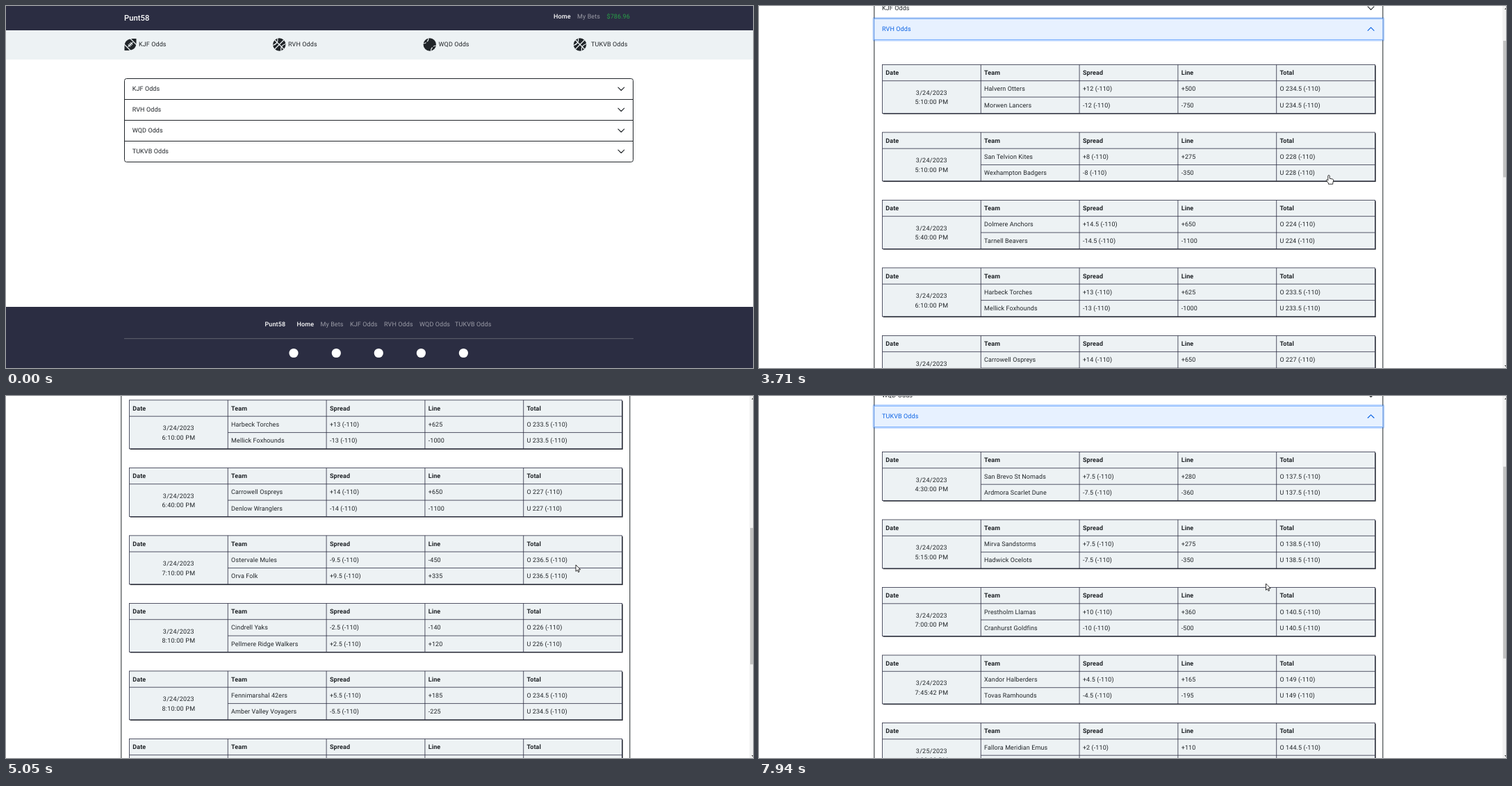
These frames come from a looping animation (1075 by 521 pixels, 8000 ms). An HTML page:

```html
<!DOCTYPE html>
<html lang="en">
<head>
<meta charset="utf-8">
<title>Odds board</title>
<style>
  html, body { margin: 0; width: 100%; height: 100%; overflow: hidden; background: #fff; }
  #stage { display: block; width: 1075px; height: 521px; }
  text {
    font: 9px Roboto, Inter, sans-serif;
    letter-spacing: .1px;
    fill: #212529;
    text-rendering: geometricPrecision;
    white-space: pre;
  }
  .brand { font-size: 11.3px; font-weight: 500; letter-spacing: 0; fill: #fff; }
  .on { font-weight: 500; fill: #fff; }
  .off { fill: #9a9ba6; }
  .cash { fill: #28a148; }
  .head { font-weight: 600; }
  .date { text-anchor: middle; letter-spacing: .25px; }
  .navy { fill: #2b2d42; }
  .pale { fill: #edf2f4; }
  .ink { fill: #212529; }
  .seam { fill: none; stroke: #edf2f4; stroke-width: 1.2; }
  .rule { fill: none; stroke: #212529; stroke-width: 1; }
  .grid { stroke: #2b2d42; stroke-width: .8; }
  .chevron { fill: none; stroke: #212529; stroke-width: 1.1; stroke-linecap: round; stroke-linejoin: round; }
  .open .label { fill: #0c63e4; }
  .open .chevron { stroke: #0c63e4; }
  .pointer { fill: #fff; stroke: #000; stroke-width: .8; stroke-linejoin: round; }
</style>
</head>
<body>
<svg id="stage" viewBox="0 0 1075 521"></svg>
<script>
const LOOP = 8000, VIEW = 521, ROW = 30, PITCH = 97.5, FOOTER = 88;
const LIST_TOP = 104.5, LIST_GAP = 36.5, BAR_SHIFT = 4.7;
const BRAND = 'Punt58';
const LEAGUES = ['KJF Odds', 'RVH Odds', 'WQD Odds', 'TUKVB Odds'];

// date time | away | home | spread | away line | home line | total
const parse = rows => rows.trim().split('\n').map(row => row.split('|'));
const GAMES = {
  1: parse(`
3/24/2023 5:10:00 PM|Halvern Otters|Morwen Lancers|+12|+500|-750|234.5
3/24/2023 5:10:00 PM|San Telvion Kites|Wexhampton Badgers|+8|+275|-350|228
3/24/2023 5:40:00 PM|Dolmere Anchors|Tarnell Beavers|+14.5|+650|-1100|224
3/24/2023 6:10:00 PM|Harbeck Torches|Mellick Foxhounds|+13|+625|-1000|233.5
3/24/2023 6:40:00 PM|Carrowell Ospreys|Denlow Wranglers|+14|+650|-1100|227
3/24/2023 7:10:00 PM|Ostervale Mules|Orva Folk|-9.5|-450|+335|236.5
3/24/2023 8:10:00 PM|Cindrell Yaks|Pellmere Ridge Walkers|-2.5|-140|+120|226
3/24/2023 8:10:00 PM|Fennimarshal 42ers|Amber Valley Voyagers|+5.5|+185|-225|234.5
3/24/2023 8:10:00 PM|Quenlow Reef|Saltamere Barons|+3|+135|-160|239
3/24/2023 8:40:00 PM|Ombrella City Cyclone|Los Mirelos Divers|+5.5|+180|-220|232.5`),
  3: parse(`
3/24/2023 4:30:00 PM|San Brevo St Nomads|Ardmora Scarlet Dune|+7.5|+280|-360|137.5
3/24/2023 5:15:00 PM|Mirva Sandstorms|Hadwick Ocelots|+7.5|+275|-350|138.5
3/24/2023 7:00:00 PM|Prestholm Llamas|Cranhurst Goldfins|+10|+360|-500|140.5
3/24/2023 7:45:42 PM|Xandor Halberders|Tovas Ramhounds|+4.5|+165|-195|149
3/25/2023 4:30:00 PM|Fallora Meridian Emus|Kestrin Valley Moles|+2|+110|-130|144.5
3/25/2023 5:50:00 PM|Gorlan Pelicans|Uldenby Stoats|+3|+130|-150|135.5`)
};
const panelHeight = i => 124 + PITCH * (GAMES[i].length - 1);
const FULL = { 1: panelHeight(1), 3: panelHeight(3) };

// ---- drawing -------------------------------------------------------
const text = (x, y, str, cls = '') => `<text x="${x}" y="${y + 3.2}" class="${cls}">${str}</text>`;
const rect = (x, y, w, h, cls, more = '') =>
  `<rect x="${x}" y="${y}" width="${w}" height="${h}" class="${cls}" ${more}/>`;
const at = (x, y, body) => `<g transform="translate(${x} ${y})">${body}</g>`;

const ball = seams => `<circle r="9.2" class="ink"/><path class="seam" d="${seams}"/>`;
const basketball = ball('M-6.5-6.5L6.5 6.5M6.5-6.5L-6.5 6.5M-2.5-9Q-1-1.5-9 1M2.5 9Q1 1.5 9-1');
const baseball = ball('M-9-1.5Q-6-1.5-5.2-3M-4-4.3Q-1.8-5.5-1.8-9M9 1.5Q6 1.5 5.2 3M4 4.3Q1.8 5.5 1.8 9');
const football = `<path class="ink" d="M-8.5 8.5V2C-8.5-5-3-8.5 3-8.5H8.5V-2C8.5 5 3 8.5-3 8.5Z"/>
  <path class="seam" d="M-9-.5L.5 9M-.5-9L9 .5M-3.4 3.4L3.4-3.4M-3.2 0L0 3.2M-1.6-1.6L1.6 1.6M0-3.2L3.2 0"/>`;

function gameTable([when, away, home, spread, awayLine, homeLine, total], n) {
  const x = 182.2, y = 36 + n * PITCH, w = 709, h = 70, col = 141.8;
  const [day, ...clock] = when.split(' ');
  const opposite = (spread[0] === '+' ? '-' : '+') + spread.slice(1);
  const cells = (values, first, dy, cls) =>
    values.map((v, i) => text(x + (i + first) * col + 4.8, y + dy, v, cls)).join('');
  const columns = [1, 2, 3, 4].map(i => `M${x + i * col} ${y}v${h}`).join('');
  return rect(x + 1.2, y + 1.2, w, h, 'ink') + rect(x, y, w, h, 'pale grid') +
    `<path class="grid" d="M${x} ${y + 23.3}h${w}M${x + col} ${y + 46.7}h${w - col}${columns}"/>` +
    cells(['Date', 'Team', 'Spread', 'Line', 'Total'], 0, 11.5, 'head') +
    cells([away, `${spread} (-110)`, awayLine, `O ${total} (-110)`], 1, 34.8) +
    cells([home, `${opposite} (-110)`, homeLine, `U ${total} (-110)`], 1, 58.1) +
    text(x + col / 2, y + 40, day, 'date') + text(x + col / 2, y + 53.7, clock.join(' '), 'date');
}

const item = (name, i) => `<g id="item${i}">` +
  (GAMES[i] ? `<svg id="panel${i}" x="0" y="${ROW}" width="1085" height="0">${GAMES[i].map(gameTable).join('')}</svg>` : '') +
  (i ? '<path class="rule" d="M170.5 0H902.5"/>' : '') +
  `<g id="glow${i}" opacity="0">
    ${rect(170.5, 0, 732, ROW, '', 'fill="#e7f1ff" stroke="#86b7fe"')}
    ${rect(169.2, -1.3, 734.6, ROW + 2.6, '', 'fill="none" stroke="#0d6efd" stroke-opacity=".25" stroke-width="2.3" rx="1"')}
  </g>` + text(181.7, 14.7, name, 'label') +
  `<g transform="translate(885.3 14.8)"><path id="chevron${i}" class="chevron" d="M-4.4-2.2L0 2.2L4.4-2.2"/></g></g>`;

const footerLinks = [[418.5, 'Home', 'on'], [452.5, 'My Bets', 'off'],
  ...LEAGUES.map((name, i) => [[495, 544, 595, 646][i], name, 'off'])];
const navIcons = [[179, football, 191], [393.3, basketball, 406], [609.8, baseball, 622.5], [826, basketball, 842]];

document.getElementById('stage').innerHTML = `
  <g id="page">
    ${rect(-10, 0, 1100, 35, 'navy')}
    ${text(170, 17.6, BRAND, 'brand')}
    ${text(788, 14.5, 'Home', 'on')}${text(822, 14.5, 'My Bets', 'off')}${text(864.5, 14.5, '$786.96', 'cash')}
    ${rect(-10, 35, 1100, 42, 'pale')}
    ${navIcons.map(([x, icon, tx], i) => at(x, 55.5, icon) + text(tx, 55.2, LEAGUES[i])).join('')}
    ${rect(170.5, LIST_TOP, 732, 120, 'rule', 'id="outline" rx="3"')}
    ${LEAGUES.map(item).join('')}
    <g id="footer">
      ${rect(-10, 0, 1100, FOOTER + 1, 'navy')}
      ${text(372.5, 24.7, BRAND, 'on')}
      ${footerLinks.map(([x, name, cls]) => text(x, 24.7, name, cls)).join('')}
      <path d="M170 45.7H903" stroke="#61636f"/>
      ${[414, 475.3, 536.3, 597.4, 658.4].map(x => `<circle cx="${x}" cy="66.5" r="6.6" fill="#fff"/>`).join('')}
    </g>
  </g>
  <g id="bar">
    ${rect(1070, 0, 5, VIEW, '', 'fill="#f1f1f1"')}
    ${rect(1071, 0, 4, 0, '', 'id="thumb" fill="#c1c1c1"')}
    <path d="M1072.8 5L1075 2.6V5ZM1072.8 517L1075 519.4V517Z" fill="#505050"/>
  </g>
  <g id="cursor">
    <path id="arrow" class="pointer" d="M0 0V9.4L2.2 7.4L3.6 10.6L5.1 10L3.7 6.9H6.7Z"/>
    <path id="hand" class="pointer" d="M-1.2 1.3Q0-.6 1.2 1.3V5.2L5.4 6.1Q6.9 6.5 6.7 8.4L5.8 11.6V13.3H-.6V11.8L-3.6 8.3Q-3.8 6.9-2.5 7.1L-1.2 8.2Z"/>
  </g>`;

// ---- motion --------------------------------------------------------
// Screen updates come in bursts: start, end, number of steps.
const BURSTS = [[690, 750, 2], [1080, 1850, 12], [1920, 1980, 2], [2180, 2970, 12], [3030, 3500, 8],
  [3710, 3980, 5], [4180, 4450, 5], [4790, 5140, 5], [5400, 5670, 5], [6000, 6280, 5],
  [6470, 7270, 12], [7330, 7540, 4], [7810, 7940, 3]];
const SCROLL = [[3000, 0], [3500, 113.3], [3682, 113.3], [3980, 226.7], [4150, 226.7], [4450, 340],
  [4760, 340], [5140, 510], [5385, 510], [5670, 680], [5970, 680], [6280, 829.5],
  [7279, 829.5], [7280, 439.5], [7540, 180]];
const POINTER = [[1040, 1020, 444], [1850, 887, 158.5], [1890, 887, 158.5], [1980, 886, 148.5],
  [2500, 886, 148.5], [2970, 820, 243], [6420, 820, 243], [6780, 870, 391], [6860, 876, 379],
  [7770, 876, 379], [7940, 729.5, 270]];
const HAND = [[1680, 4790], [6680, 7810]];
const FIRST_CLICK = 2140, SECOND_CLICK = 6850;

const clamp = v => Math.max(0, Math.min(1, v));
const ease = v => v * v * (3 - 2 * v);
const ramp = (t, start, span) => ease(clamp((t - start) / span));

function track(t, keys) {
  const next = keys.findIndex(key => key[0] > t);
  if (next === 0) return keys[0].slice(1);
  if (next < 0) return keys[keys.length - 1].slice(1);
  const a = keys[next - 1], b = keys[next], k = ramp(t, a[0], b[0] - a[0]);
  return a.slice(1).map((v, i) => v + (b[i + 1] - v) * k);
}

// Steps land on a 10 ms clock, so each may begin slightly early.
function heldTime(t) {
  let held = 0;
  for (const [start, end, steps] of BURSTS) {
    if (t < start) break;
    const step = (end - start) / (steps - 1);
    held = start + step * Math.min(steps - 1, Math.floor((t - start) / step + .15));
  }
  return held;
}

const $ = id => document.getElementById(id);
const set = (id, attrs) => { for (const key in attrs) $(id).setAttribute(key, attrs[key]); };
const move = (id, x, y) => set(id, { transform: `translate(${x} ${y})` });

function draw(t) {
  const opened = span => ({
    1: ramp(t, FIRST_CLICK, span) - ramp(t, SECOND_CLICK, span),
    3: ramp(t, SECOND_CLICK, span)
  });
  const grow = opened(380), glow = opened(150), turn = opened(200);

  let y = LIST_TOP;
  LEAGUES.forEach((_, i) => {
    move('item' + i, 0, y);
    y += ROW;
    if (!GAMES[i]) return;
    const height = FULL[i] * grow[i];
    set('panel' + i, { height });
    set('glow' + i, { opacity: glow[i] });
    set('chevron' + i, { transform: `rotate(${-180 * turn[i]})` });
    $('item' + i).classList.toggle('open', glow[i] > .5);
    y += height;
  });
  set('outline', { height: y - LIST_TOP });

  const pageHeight = Math.max(VIEW, y + LIST_GAP + FOOTER);
  const scroll = Math.min(track(t, SCROLL)[0], pageHeight - VIEW);
  const hasBar = pageHeight > VIEW;
  move('footer', 0, pageHeight - FOOTER);
  move('page', hasBar ? -BAR_SHIFT : 0, -scroll);
  set('bar', { visibility: hasBar ? 'visible' : 'hidden' });
  const ratio = 509 / pageHeight;
  set('thumb', { y: 6.3 + scroll * ratio, height: VIEW * ratio });

  const isHand = HAND.some(([from, to]) => t >= from && t < to);
  move('cursor', ...track(t, POINTER));
  set('cursor', { opacity: clamp((t - 630) / 120) });
  set('hand', { visibility: isHand ? 'visible' : 'hidden' });
  set('arrow', { visibility: isHand ? 'hidden' : 'visible' });
}

const begin = performance.now();
function tick() {
  draw(heldTime((performance.now() - begin) % LOOP));
  requestAnimationFrame(tick);
}
tick();
</script>
</body>
</html>
```
